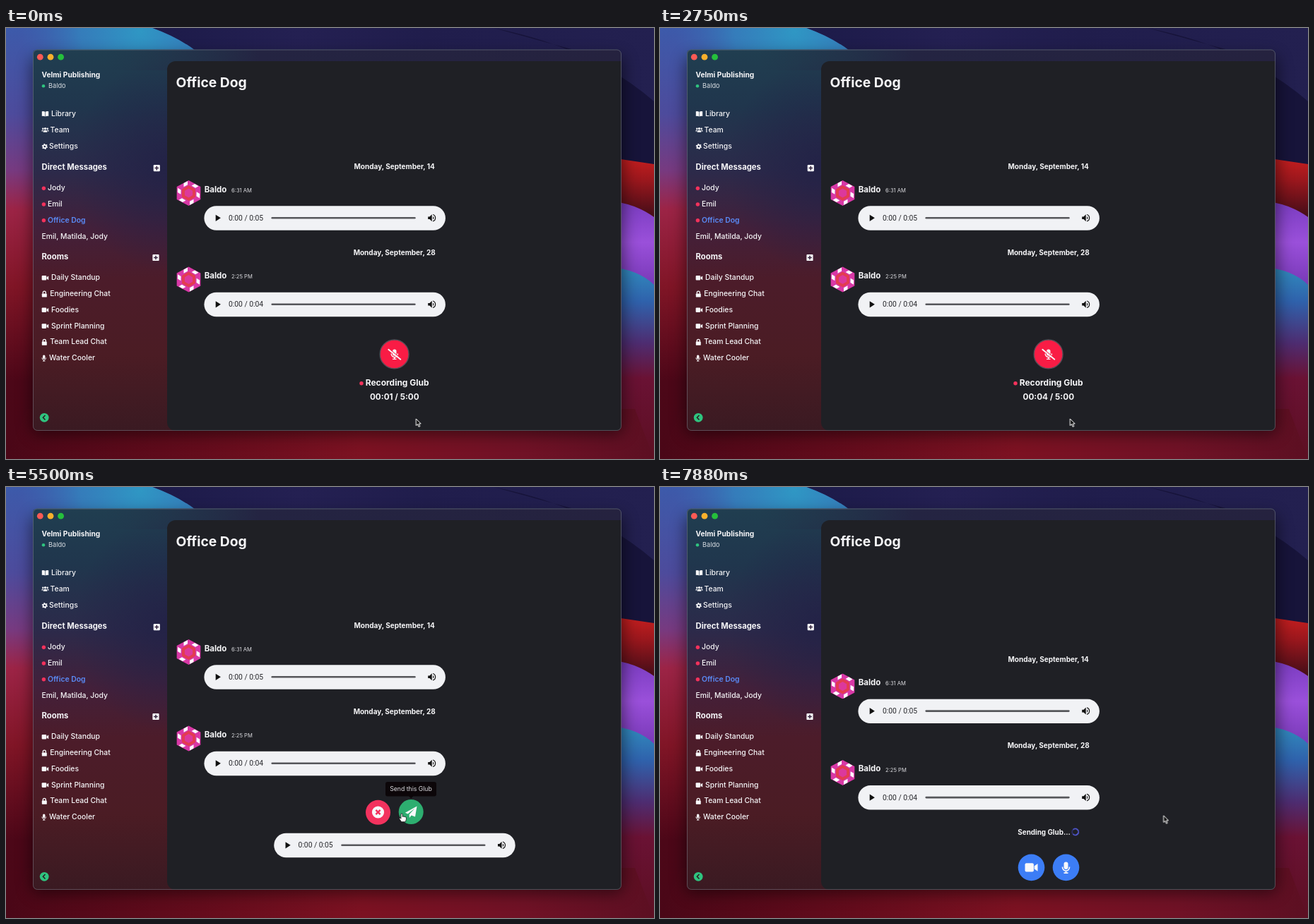
An HTML page that plays this animation: 917x611 px, repeating every 8 s.

```html
<!DOCTYPE html>
<html lang="en">
<head>
<meta charset="utf-8">
<title>Voice message</title>
<style>
html, body { margin: 0; width: 100%; height: 100%; overflow: hidden; background: #1d1a40; }
svg { display: block; }
text { font-family: Inter, "Open Sans", sans-serif; fill: #f6f6f8; font-weight: 500; }
.list { font-size: 10.4px; }
.head { font-size: 11.3px; font-weight: 700; }
.bold { font-weight: 700; }
.mid { text-anchor: middle; font-weight: 700; }
.date { font-size: 10px; }
.name { font-size: 11.5px; font-weight: 700; }
.time { font-size: 7.6px; font-weight: 400; fill: #dcdce0; }
.clock { font: 400 10.3px Roboto, sans-serif; fill: #26272b; }
.white { fill: #f8f8fa; }
.line { fill: none; stroke: #f8f8fa; }

.anim { animation: 8s infinite step-end; }
.record { animation-name: record; }
.review { animation-name: review; }
.sending { animation-name: sending; }
.messages { animation-name: shift; }
.idle { animation-name: idle; }
.hover { animation-name: hover; }
.arrow { animation-name: arrow; }
.hand { animation-name: hand; }
.tick { animation-name: tick; animation-delay: calc(var(--n) * 1s - 8.5s); }
.tip { animation: tip 8s linear infinite; }
.pointer { animation: pointer 8s ease-in-out infinite; }
.spin { animation: spin 1s linear infinite; }

@keyframes record { 0% { opacity: 1 } 54.75%, 100% { opacity: 0 } }
@keyframes review { 0% { opacity: 0 } 54.75% { opacity: 1 } 75%, 100% { opacity: 0 } }
@keyframes sending { 0% { opacity: 0 } 75%, 100% { opacity: 1 } }
@keyframes shift { 0% { transform: translateY(0) } 75%, 100% { transform: translateY(48.4px) } }
@keyframes idle { 0% { opacity: 1 } 42.5%, 100% { opacity: 0 } }
@keyframes hover { 0% { opacity: 0 } 42.5%, 100% { opacity: 1 } }
@keyframes arrow { 0% { opacity: 1 } 42.5% { opacity: 0 } 75%, 100% { opacity: 1 } }
@keyframes hand { 0% { opacity: 0 } 42.5% { opacity: 1 } 75%, 100% { opacity: 0 } }
@keyframes tick { 0% { opacity: 1 } 12.5%, 100% { opacity: 0 } }
@keyframes tip { 0%, 57% { opacity: 0 } 59%, 100% { opacity: 1 } }
@keyframes pointer {
  0%, 36% { transform: translate(580.3px, 554px) }
  44.5%, 88% { transform: translate(560px, 463px) }
  95.5%, 100% { transform: translate(712.6px, 465.7px) }
}
@keyframes spin { to { transform: rotate(360deg) } }
</style>
</head>
<body>
<svg width="917" height="611" viewBox="0 0 917 611">
<defs>
  <linearGradient id="navy" x2="1" y2="0">
    <stop offset=".25" stop-color="#1d1b4a"/><stop offset=".45" stop-color="#242052"/>
    <stop offset=".65" stop-color="#201d4c"/><stop offset="1" stop-color="#232050"/>
  </linearGradient>
  <linearGradient id="left" x2="0" y2="1">
    <stop offset="0" stop-color="#3d5aaa"/><stop offset=".2" stop-color="#4d4b9c"/>
    <stop offset=".33" stop-color="#773a80"/><stop offset=".42" stop-color="#9c2446"/>
    <stop offset=".6" stop-color="#801526"/><stop offset=".82" stop-color="#4c0718"/>
    <stop offset="1" stop-color="#4a0717"/>
  </linearGradient>
  <radialGradient id="sky" gradientUnits="userSpaceOnUse" cx="190" cy="5" r="170">
    <stop offset="0" stop-color="#2f97c4"/><stop offset=".5" stop-color="#3288c0" stop-opacity=".75"/>
    <stop offset="1" stop-color="#3a6ab4" stop-opacity="0"/>
  </radialGradient>
  <linearGradient id="red" x2="0" y2="1">
    <stop offset="0" stop-color="#c41e1f"/><stop offset=".3" stop-color="#9a171d"/><stop offset=".75" stop-color="#4a0e18"/>
  </linearGradient>
  <linearGradient id="purple" x2="0" y2="1">
    <stop offset="0" stop-color="#7a3cc0"/><stop offset=".4" stop-color="#9a50da"/><stop offset="1" stop-color="#6a2fa8"/>
  </linearGradient>
  <linearGradient id="blue" x2="0" y2="1">
    <stop offset="0" stop-color="#318cbe"/><stop offset=".18" stop-color="#2f62ac"/>
    <stop offset=".4" stop-color="#4e2c70"/><stop offset=".58" stop-color="#6a1234"/><stop offset="1" stop-color="#5c0f22"/>
  </linearGradient>
  <linearGradient id="floor" x2="1" y2="0">
    <stop offset="0" stop-color="#4a0717"/><stop offset=".3" stop-color="#640c1c"/>
    <stop offset=".55" stop-color="#7c1222"/><stop offset=".8" stop-color="#701226"/><stop offset="1" stop-color="#5c0f22"/>
  </linearGradient>
  <linearGradient id="side" x2="0" y2="1">
    <stop offset="0" stop-color="#203e50"/><stop offset=".15" stop-color="#20364d"/>
    <stop offset=".32" stop-color="#2c2a4a"/><stop offset=".47" stop-color="#43203a"/>
    <stop offset=".6" stop-color="#4c1c2a"/><stop offset=".8" stop-color="#4b1c24"/><stop offset="1" stop-color="#3a1a22"/>
  </linearGradient>
  <radialGradient id="dusk">
    <stop offset="0" stop-color="#222146" stop-opacity=".85"/><stop offset="1" stop-color="#222146" stop-opacity="0"/>
  </radialGradient>
  <linearGradient id="bar" x2="1" y2="0">
    <stop offset="0" stop-color="#243048" stop-opacity="0"/><stop offset=".3" stop-color="#242442"/>
    <stop offset="1" stop-color="#25223f"/>
  </linearGradient>
  <clipPath id="frame"><rect x="38" y="30.5" width="832.5" height="540.5" rx="6"/></clipPath>

  <g id="video" class="white"><rect x="-9" y="-6.2" width="12.4" height="12.4" rx="2"/><path d="M4.2-2.2 9-5.4V5.4L4.2 2.2Z"/></g>
  <g id="mic">
    <rect class="white" x="-3" y="-8" width="6" height="10.4" rx="3"/>
    <path class="line" stroke-width="1.6" d="M-5-1.2v.7a5 5 0 0 0 10 0v-.7M0 4.6V7.4M-3 7.5H3"/>
  </g>
  <g id="lock"><rect class="white" x="-3.5" y="-.8" width="7" height="5.2" rx=".9"/><path class="line" stroke-width="1.3" d="M-2-.5V-2a2 2 0 0 1 4 0v1.5"/></g>
  <g id="plus"><rect class="white" x="-4.6" y="-4.6" width="9.2" height="9.2" rx="1.2"/><path d="M-2.8 0H2.8M0-2.8V2.8" stroke="#33233c" stroke-width="1.5"/></g>
  <circle id="dot" r="2.7" fill="#f5325c"/>
  <g id="player">
    <rect width="341.5" height="34.5" rx="17.25" fill="#f1f2f5"/>
    <path d="M16.3 12.5V21.7L23.5 17.1Z" fill="#111"/>
    <path d="M96.3 17H298" stroke="#56575b" stroke-width="2.6" stroke-linecap="round"/>
    <path d="M316.8 15.2h2.3l3.2-3.2V22l-3.2-3.2h-2.3Z" fill="#111"/>
    <path d="M323.7 14.7a2.7 2.7 0 0 1 0 4.6" fill="#111"/>
    <path d="M323.7 12.3a4.9 4.9 0 0 1 0 9.4" fill="none" stroke="#111" stroke-width="1.2"/>
  </g>
  <path id="hex" d="M0-18 15.6-9V9L0 18-15.6 9V-9Z"/>
  <path id="chip" d="M-7-14-1.5-17V-11.8L-7-8.8Z" fill="#fff"/>
  <g id="avatar">
    <use href="#hex" transform="scale(1.08 1)" fill="#d838a6"/>
    <use href="#chip"/><use href="#chip" transform="rotate(60)"/><use href="#chip" transform="rotate(120)"/>
    <use href="#chip" transform="rotate(180)"/><use href="#chip" transform="rotate(240)"/><use href="#chip" transform="rotate(300)"/>
    <use href="#hex" transform="scale(.61)" fill="#e33c50"/>
    <use href="#hex" transform="scale(.36)" fill="#dc389c"/>
  </g>
  <g id="muted">
    <use href="#mic" transform="scale(.9)"/>
    <path d="M-8.2-7.6 8.8 6.4" stroke="#f91c45" stroke-width="2.2"/>
    <path class="line" d="M-8.5-6.8 8.5 7.1" stroke-width="1.9" stroke-linecap="round"/>
  </g>
</defs>

<!-- wallpaper -->
<rect width="917" height="611" fill="url(#navy)"/>
<path d="M690 0Q830 28 917 104V200H800V30Z" fill="#17143a"/>
<path d="M0 0H207Q243 13 268 32L300 200V611H0Z" fill="url(#left)"/>
<path d="M0 0H207Q243 13 268 32L300 200H0Z" fill="url(#sky)"/>
<path d="M860 184.500 917 193V290H860Z" fill="url(#red)"/>
<path d="M860 246Q892 250 917 268V390H860Z" fill="url(#purple)"/>
<path d="M850 338Q895 342 917 364V611H850Z" fill="url(#blue)"/>
<path d="M30 540H890L917 611H0Z" fill="url(#floor)"/>
<rect x="36" y="40" width="838" height="536" rx="10" opacity=".5" style="filter:blur(11px)"/>

<!-- window -->
<g clip-path="url(#frame)">
  <rect x="38" y="30" width="833" height="542" fill="url(#side)"/>
  <ellipse cx="225" cy="195" rx="130" ry="150" fill="url(#dusk)"/>
  <rect x="140" y="30" width="731" height="30" fill="url(#bar)"/>
  <path d="M871 47H240a12 12 0 0 0-12 12V559a12 12 0 0 0 12 12H871Z" fill="#1f2025"/>
</g>
<rect x="38.5" y="31" width="832" height="539.5" rx="6" fill="none" stroke="#8a8a98" stroke-opacity=".45"/>
<circle cx="48.3" cy="41.2" r="4.4" fill="#fb5a55"/>
<circle cx="63" cy="41.2" r="4.4" fill="#f8b02c"/>
<circle cx="77.6" cy="41.2" r="4.4" fill="#25c03c"/>

<!-- sidebar -->
<text class="bold" x="50.5" y="70.4" font-size="10.2">Velmi Publishing</text>
<circle cx="53" cy="82.3" r="2.3" fill="#2fc47f"/>
<text x="60" y="85.4" font-size="9.2" style="font-weight:400;fill:#d8dde2">Baldo</text>
<g class="list">
  <path class="white" d="M50.8 118.2Q53.5 117.6 55.2 118.7V125.6Q53.5 124.5 50.8 124.9ZM60.2 118.2Q57.5 117.6 55.8 118.7V125.6Q57.5 124.5 60.2 124.9Z"/>
  <text x="64" y="124.7">Library</text>
  <g class="white">
    <circle cx="55.5" cy="142.6" r="1.7"/><circle cx="52.3" cy="142.8" r="1.2"/><circle cx="58.7" cy="142.8" r="1.2"/>
    <path d="M52.7 147.8v-1q0-2 2.8-2t2.8 2v1ZM50.5 146.5v-.8q0-1.3 1.9-1.3l.5.4q-.8.7-.8 1.7ZM60.5 146.5v-.8q0-1.3-1.9-1.3l-.5.4q.8.7.8 1.7Z"/>
  </g>
  <text x="62.5" y="147.7">Team</text>
  <circle class="line" cx="54.8" cy="168" r="2.2" stroke-width="1.8"/>
  <circle class="line" cx="54.8" cy="168" r="3.5" stroke-width="1.2" stroke-dasharray="1.8 1.865"/>
  <text x="61" y="171">Settings</text>

  <text class="head" x="50.5" y="201">Direct Messages</text>
  <use href="#plus" x="213.3" y="198.6"/>
  <use href="#dot" x="53.4" y="227.2"/><text x="59" y="230.3">Jody</text>
  <use href="#dot" x="53.4" y="250"/><text x="59" y="253.2">Emil</text>
  <use href="#dot" x="53.4" y="272.7"/><text x="59" y="275.9" style="fill:#5a8bf7;font-weight:600">Office Dog</text>
  <text x="50.5" y="298.6">Emil, Matilda, Jody</text>

  <text class="head" x="50.5" y="328">Rooms</text>
  <use href="#plus" x="212" y="325.5"/>
  <use href="#video" transform="translate(55.4 354.3) scale(.53)"/><text x="64" y="357.2">Daily Standup</text>
  <use href="#lock" x="54.3" y="377.2"/><text x="62.2" y="380.2">Engineering Chat</text>
  <use href="#video" transform="translate(55.4 399.8) scale(.53)"/><text x="64" y="402.7">Foodies</text>
  <use href="#video" transform="translate(55.4 422.6) scale(.53)"/><text x="64" y="425.6">Sprint Planning</text>
  <use href="#lock" x="54.3" y="445.4"/><text x="62.2" y="448.3">Team Lead Chat</text>
  <use href="#mic" transform="translate(53.7 468) scale(.56)"/><text x="61" y="471.1">Water Cooler</text>
</g>
<circle cx="54.2" cy="552.3" r="6.4" fill="#2fc47f"/>
<path d="M55.5 549.1 52.4 552.3 55.5 555.5" fill="none" stroke="#2a1a20" stroke-width="1.5"/>

<!-- conversation -->
<text class="bold" x="240.6" y="83.9" font-size="19.3">Office Dog</text>
<g class="anim messages">
  <text class="mid date" x="549.7" y="199.6">Monday, September, 14</text>
  <use href="#avatar" x="258.5" y="234"/>
  <text class="name" x="280.7" y="232.6">Baldo</text>
  <text class="time" x="319" y="232.7">6:31 AM</text>
  <use href="#player" x="280.4" y="252.2"/>
  <text class="clock" x="315" y="272.9">0:00 / 0:05</text>
  <text class="mid date" x="549.7" y="322">Monday, September, 28</text>
  <use href="#avatar" x="258.5" y="356.5"/>
  <text class="name" x="280.7" y="355.1">Baldo</text>
  <text class="time" x="319" y="355.2">2:25 PM</text>
  <use href="#player" x="280.4" y="374.7"/>
  <text class="clock" x="315" y="395.4">0:00 / 0:04</text>
</g>

<g class="anim record">
  <g class="anim idle">
    <circle cx="549.6" cy="462.4" r="20.4" fill="#f91c45" stroke="#5e4d58" stroke-width="1.4"/>
    <use href="#muted" x="549.8" y="462.6"/>
  </g>
  <g class="anim hover">
    <circle cx="549.5" cy="461.6" r="18.7" fill="#f91c45"/>
    <use href="#muted" x="549.7" y="461.8"/>
  </g>
  <use href="#dot" x="503" y="503.7"/>
  <text class="bold" x="508.7" y="507" font-size="12">Recording Glub</text>
  <g font-size="11.7">
    <text class="mid anim tick" x="549.8" y="526.6" style="--n:0">00:01 / 5:00</text>
    <text class="mid anim tick" x="549.8" y="526.6" style="--n:1">00:02 / 5:00</text>
    <text class="mid anim tick" x="549.8" y="526.6" style="--n:2">00:03 / 5:00</text>
    <text class="mid anim tick" x="549.8" y="526.6" style="--n:3">00:04 / 5:00</text>
    <text class="mid anim tick" x="549.8" y="526.6" style="--n:4">00:05 / 5:00</text>
  </g>
</g>

<g class="anim review">
  <circle cx="526.5" cy="461.3" r="17.5" fill="#f3325e"/>
  <circle class="white" cx="526.5" cy="461" r="8.6"/>
  <path d="M523.4 457.9l6.2 6.2m0-6.2l-6.2 6.2" stroke="#f3325e" stroke-width="2.5"/>
  <circle cx="573.2" cy="460.5" r="17.5" fill="#2dae70"/>
  <path class="white" d="M581.5 452.6 579 467.6 573.7 465.5 570.9 468.9 570.6 464.2 578.3 455.7 568.6 463.5 564.9 461.8Z"/>
  <g class="tip">
    <path d="M540 418h66a3 3 0 0 1 3 3v14.5a3 3 0 0 1-3 3h-29.8l-3 3-3-3H540a3 3 0 0 1-3-3V421a3 3 0 0 1 3-3Z" fill="#0c0609"/>
    <text x="573" y="431.3" font-size="8.7" text-anchor="middle" style="font-weight:400;fill:#dedee2">Send this Glub</text>
  </g>
  <use href="#player" x="379.2" y="490.7"/>
  <text class="clock" x="413.6" y="511.4">0:00 / 0:05</text>
</g>

<g class="anim sending">
  <text class="bold" x="506.3" y="492.9" font-size="9.9">Sending Glub...</text>
  <g transform="translate(587.7 488.9)">
    <g class="spin" fill="none" stroke-width="1.4">
      <circle r="4.5" stroke="#33357c"/>
      <path d="M0-4.5A4.5 4.5 0 1 1-4.5 0" stroke="#5b63ee"/>
    </g>
  </g>
  <circle cx="525.5" cy="539.4" r="18.8" fill="#3c7df6"/>
  <use href="#video" x="525.5" y="539.4"/>
  <circle cx="574.5" cy="539.4" r="18.8" fill="#3c7df6"/>
  <use href="#mic" x="574.5" y="539.6"/>
</g>

<g class="pointer" stroke-linejoin="round">
  <path class="anim arrow" d="M0 0V9.6L2.2 7.6 3.9 11.4 5.5 10.7 3.9 7H6.9Z" fill="#111" stroke="#fff"/>
  <path class="anim hand" d="M-1.1 1.1a1.1 1.1 0 0 1 2.2 0V4.4a1 1 0 0 1 1.9.3 1 1 0 0 1 1.9.4 .9.9 0 0 1 1.5.8V8.2L5.3 11.7H-.3L-3.3 7.6a1 1 0 0 1 1.6-1.1L-1.1 7.2Z" fill="#fff" stroke="#111" stroke-width=".8"/>
</g>
</svg>
</body>
</html>
```
